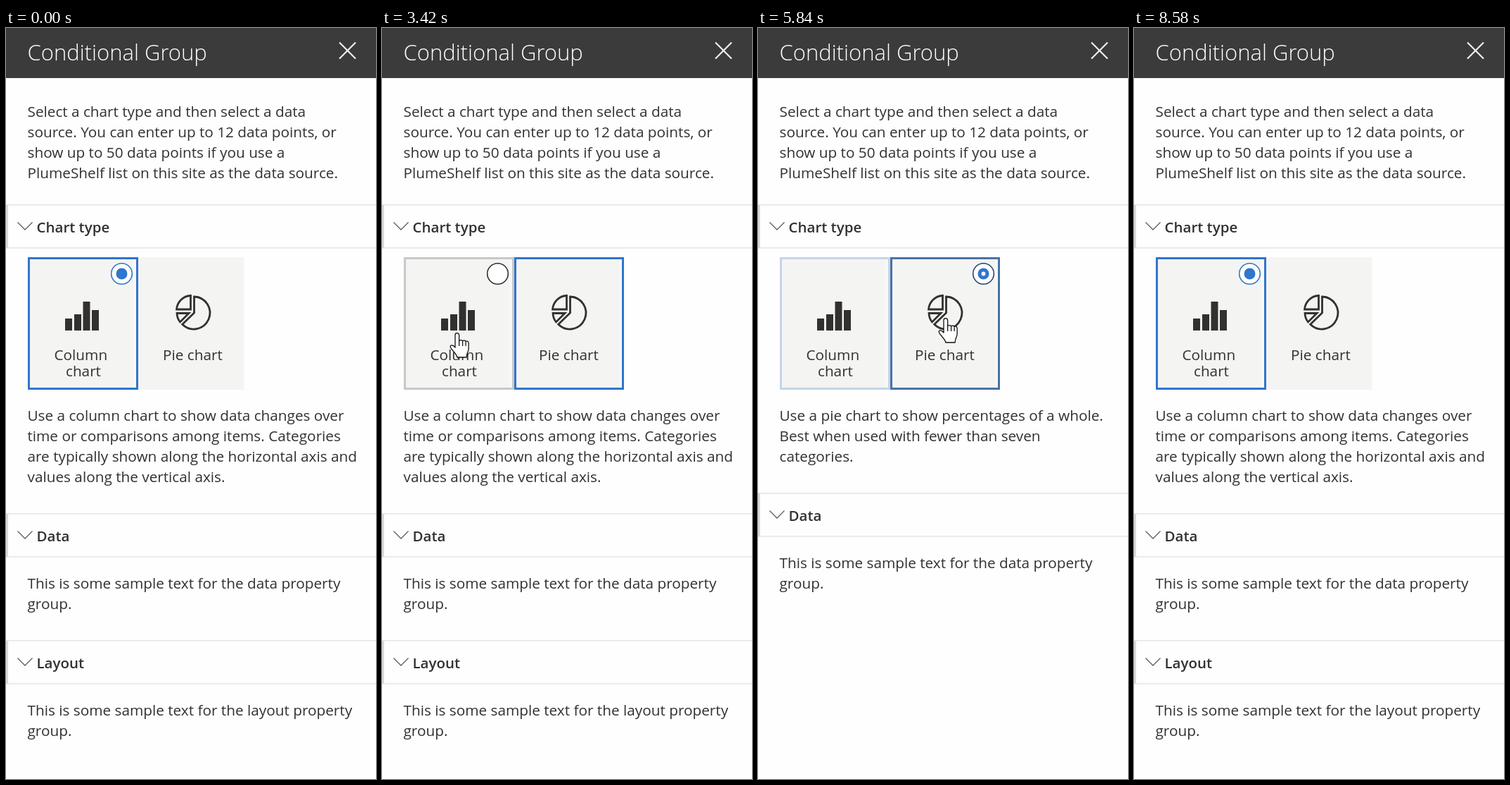
Recreate the animation shown at these times as an HTML page with a canvas. Size 526x1065 px, loop 9.28 s.

```html
<!DOCTYPE html>
<html lang="en">
<head>
<meta charset="utf-8">
<title>Conditional Group</title>
<style>
  html, body { margin: 0; width: 100%; height: 100%; overflow: hidden; background: #fefefe; }
  canvas { display: block; width: 526px; height: 1065px; }
</style>
</head>
<body>
<canvas id="stage"></canvas>
<script>
const W = 526, H = 1065, LOOP = 9280;
const canvas = document.getElementById('stage');
const ctx = canvas.getContext('2d');
const dpr = window.devicePixelRatio || 1;
canvas.width = W * dpr;
canvas.height = H * dpr;

const FAMILY = '"Open Sans", "Noto Sans", sans-serif';
const BODY = '400 20.75px ' + FAMILY;
const HEAD = '600 20.5px ' + FAMILY;
const TITLE = '300 31px ' + FAMILY;

const INK = '#323130';
const TILE = [244, 244, 243], GRAY = [200, 200, 200], DARK = [50, 49, 48];
const BLUE = [48, 117, 207], DEEP = [31, 87, 153];

const INTRO = ['Select a chart type and then select a data',
  'source. You can enter up to 12 data points, or',
  'show up to 50 data points if you use a',
  'PlumeShelf list on this site as the data source.'];
const ABOUT = [
  ['Use a column chart to show data changes over',
   'time or comparisons among items. Categories',
   'are typically shown along the horizontal axis and',
   'values along the vertical axis.'],
  ['Use a pie chart to show percentages of a whole.',
   'Best when used with fewer than seven',
   'categories.']];

// Tile 0 is the column chart, tile 1 the pie chart.
const TILES = [{ x: 31, w: 157 }, { x: 188, w: 156 }];
const TOP = 325, TALL = 188;

// Clicks: [start of the colour change, tile]
const CLICKS = [[-1000, 0], [1290, 1], [3440, 0], [5705, 1], [7740, 0]];
const FADE = 180, LAG = 30;

// Pointer path: [time, x, y]
const PATH = [
  [320, 530, 895], [760, 392, 630], [1210, 241, 400], [2140, 241, 400],
  [2380, 205, 490], [2560, 178, 538], [2800, 130, 480], [3010, 107, 433],
  [4080, 107, 433], [4280, 210, 640], [4540, 399, 1019], [4680, 450, 1036],
  [5000, 467, 900], [5250, 400, 620], [5460, 300, 322], [5640, 267, 412],
  [6150, 267, 412], [6550, 187, 492], [7040, 97, 438], [7120, 98, 436],
  [7920, 98, 436], [8240, 240, 720], [8540, 389, 1056], [8580, 389, 1056]];

const HAND = new Path2D('M-3 18V2.5a2.8 2.8 0 0 1 5.6 0V11c0-2 5-2 5 .5c0-2 4.5-2 4.5.8' +
  'c0-1.8 4-1.8 4 1.5V22c0 4-3 6-3 12H0C-1 29-7 25-9.5 20C-11 16.5-7 15-3 20z');
const KNUCKLES = new Path2D('M2.6 11V18M7.6 12V18M12.1 13V18');
const ARROW = new Path2D('M.5 .5V26.5L6.5 21L10.5 30L14.5 28.2L10.6 19.5H19Z');
const PIE = new Path2D('M267.5 381A23 23 0 1 1 250.7 420.3L267.5 404Z' +
  'M262.5 379.5V399H242.5A21 21 0 0 1 262.5 379.5Z' +
  'M243 404.5H260L247.5 417A21 21 0 0 1 243 404.5Z');

const clamp = v => Math.max(0, Math.min(1, v));
const mix = (a, b, k) => a.map((v, i) => v + (b[i] - v) * k);
const rgb = c => `rgb(${c.map(Math.round).join(',')})`;

function slope(i, axis) {
  const a = PATH[i - 1], b = PATH[i], c = PATH[i + 1];
  if (!a || !c) return 0;
  const still = (p, q) => p[1] === q[1] && p[2] === q[2];
  if (still(a, b) || still(b, c)) return 0;
  return (c[axis] - a[axis]) / (c[0] - a[0]);
}

function pointer(t) {
  if (t < PATH[0][0] || t >= PATH[PATH.length - 1][0]) return null;
  let i = 0;
  while (t >= PATH[i + 1][0]) i++;
  const a = PATH[i], b = PATH[i + 1], d = b[0] - a[0], u = (t - a[0]) / d;
  return [1, 2].map(k =>
    a[k] * (1 + 2 * u) * (1 - u) ** 2 + b[k] * u * u * (3 - 2 * u) +
    d * (slope(i, k) * u * (1 - u) ** 2 - slope(i + 1, k) * u * u * (1 - u)));
}

function hovered(t) {
  const p = pointer(t);
  if (!p || p[1] < TOP || p[1] > TOP + TALL) return -1;
  return TILES.findIndex(s => p[0] >= s.x && p[0] < s.x + s.w);
}

// Hover fades over a tenth of a second.
function hoverLevel(t, tile) {
  let n = 0;
  for (let k = 0; k < 10; k++) n += hovered(t - k * 10) === tile;
  return n / 10;
}

const chosen = t => CLICKS.filter(c => t >= c[0] - LAG).pop();

function rect(x, y, w, h, fill) {
  ctx.fillStyle = fill;
  ctx.fillRect(x, y, w, h);
}

function write(str, x, y, font = BODY, fill = INK) {
  ctx.font = font;
  ctx.fillStyle = fill;
  ctx.fillText(str, x, y);
}

function para(lines, y) {
  lines.forEach((s, i) => write(s, 30.5, y + i * 29));
}

function polyline(points, width, color) {
  ctx.beginPath();
  points.forEach(p => ctx.lineTo(...p));
  ctx.lineWidth = width;
  ctx.strokeStyle = color;
  ctx.stroke();
}

function section(name, y) {
  rect(0, y, W, 1.6, '#e6e6e6');
  rect(0, y + 61, W, 1.6, '#e6e6e6');
  rect(0, y + 1, 3, 61, '#dadada');
  polyline([[16.5, y + 25.5], [27, y + 36], [37.5, y + 25.5]], 1.3, '#605e5c');
  write(name, 43.5, y + 40, HEAD);
}

function disc(x, y, r, fill, stroke, width) {
  ctx.beginPath();
  ctx.arc(x, y, r, 0, Math.PI * 2);
  if (fill) { ctx.fillStyle = fill; ctx.fill(); }
  if (stroke) { ctx.strokeStyle = stroke; ctx.lineWidth = width; ctx.stroke(); }
}

function radio(x, level, hover) {
  const y = 348.5, edge = mix(DARK, mix(BLUE, DEEP, hover), level ** 2);
  disc(x, y, 14.8, '#fff', rgb(edge), 1.6);
  if (level <= 0) return;
  const thick = Math.min(8, 8 * level ** 1.6);
  disc(x, y, 8 - thick / 2, null, rgb(BLUE), thick);
}

function tile(t, i) {
  const { x, w } = TILES[i], [start, pick] = chosen(t);
  const k = clamp((t - start) / FADE);
  const level = pick === i ? k : start < 0 ? 0 : 1 - k;
  const hover = hoverLevel(t, i);
  const framed = level > 0 || hover > 0;
  rect(x, TOP, 150.5, TALL, rgb(TILE));
  if (framed) {
    rect(x + 150.5, TOP, w - 150.5, TALL, '#f8f8f7');
    ctx.lineWidth = 3;
    ctx.strokeStyle = rgb(mix(mix(TILE, GRAY, hover), mix(BLUE, DEEP, hover), level));
    ctx.strokeRect(x + 1.5, TOP + 1.5, w - 3, TALL - 3);
  }
  if (pick === i || hovered(t) === i) radio(i ? 320.5 : 164.5, pick === i ? level : 0, hover);
}

function icons() {
  [[84, 412], [97, 406], [109.5, 388], [122, 400]].forEach(([x, y]) =>
    rect(x, y, 10, 429 - y, INK));
  ctx.strokeStyle = INK;
  ctx.lineWidth = 2.8;
  ctx.stroke(PIE);
  write('Column', 68.5, 471);
  write('chart', 85, 494);
  write('Pie chart', 223, 471);
}

function drawPointer(t) {
  const p = pointer(t);
  if (!p) return;
  ctx.save();
  ctx.translate(p[0], p[1]);
  ctx.lineJoin = 'round';
  ctx.fillStyle = '#fff';
  ctx.strokeStyle = '#111';
  ctx.lineWidth = 1.3;
  const hand = hovered(t) >= 0, shape = hand ? HAND : ARROW;
  ctx.fill(shape);
  ctx.stroke(shape);
  if (hand) ctx.stroke(KNUCKLES);
  ctx.restore();
}

function draw(t) {
  ctx.setTransform(dpr, 0, 0, dpr, 0, 0);
  rect(0, 0, W, H, '#fefefe');
  rect(0, 0, W, 71, '#3b3b3b');
  write('Conditional Group', 30.5, 46, TITLE, '#fff');
  polyline([[474, 20.5], [497, 43.5]], 2, '#fff');
  polyline([[497, 20.5], [474, 43.5]], 2, '#fff');

  para(INTRO, 126);
  section('Chart type', 250);
  tile(t, 0);
  tile(t, 1);
  icons();

  const pie = chosen(t)[1], shift = pie ? -29 : 0;
  para(ABOUT[pie], 557);
  section('Data', 688 + shift);
  para(['This is some sample text for the data property', 'group.'], 795 + shift);
  if (!pie) {
    section('Layout', 868);
    para(['This is some sample text for the layout property', 'group.'], 975);
  }
  drawPointer(t);
}

const began = performance.now();
function tick() {
  draw((performance.now() - began) % LOOP);
  requestAnimationFrame(tick);
}
tick();
</script>
</body>
</html>
```
